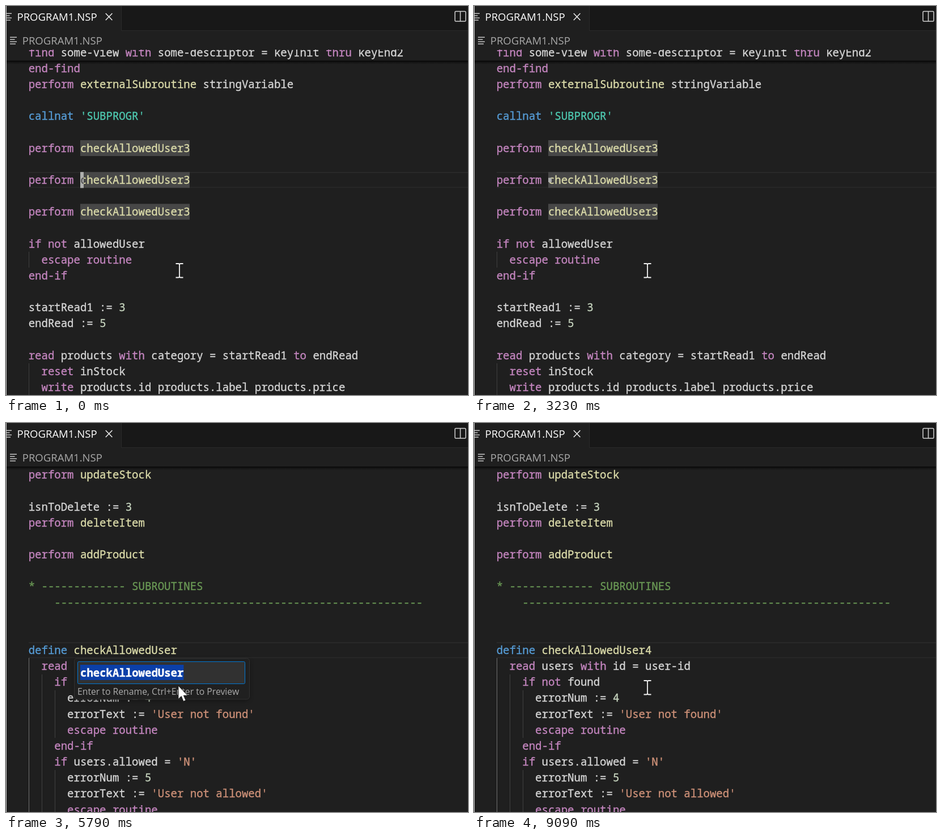
An HTML page for the animation above (9160 ms loop, 815 px wide and 687 px high).

```html
<!DOCTYPE html>
<html lang="en">
<head>
<meta charset="utf-8">
<title>Rename symbol</title>
<style>
  html, body { margin: 0; width: 100%; height: 100%; overflow: hidden; background: #1f1f1f; }
  svg { display: block; width: 815px; height: 687px; }
  text { white-space: pre; }
  .code { --ink: #d6d6d6; font: 19px "Noto Sans Mono", monospace; font-variant-ligatures: none; }
  .code, .code tspan { fill: var(--ink); stroke: var(--ink); stroke-width: .35px; }
  .ui { font: 18.5px "Open Sans", sans-serif; }
  .hint { font: 15.75px "Open Sans", sans-serif; fill: #ababab; }
  .key { --ink: #c586c0; }
  .fn { --ink: #dcdcaa; }
  .def { --ink: #569cd6; }
  .prog { --ink: #4ec9b0; }
  .str { --ink: #ce9178; }
  .num { --ink: #c6d4be; }
  .note { --ink: #6a9955; }
  #under { --ink: #515052; }
  .picked { --ink: #fff; font-weight: 600; }
</style>
</head>
<body>
<svg viewBox="0 0 815 687">
  <defs>
    <linearGradient id="shade" x2="0" y2="1">
      <stop stop-color="#000" stop-opacity=".85"/>
      <stop offset=".35" stop-color="#000" stop-opacity=".4"/>
      <stop offset="1" stop-color="#000" stop-opacity="0"/>
    </linearGradient>
    <clipPath id="stickyClip"><rect y="77" width="815" height="20"/></clipPath>
    <clipPath id="caretClip"><rect id="caretHole" width="6" height="28"/></clipPath>
    <filter id="soft" x="-10%" y="-20%" width="120%" height="140%"><feGaussianBlur stdDeviation="4"/></filter>
  </defs>
  <rect width="815" height="687" fill="#1f1f1f"/>

  <g id="calls"></g>
  <g id="routine"></g>

  <g id="caret">
    <rect id="bar" width="6" fill="#aeafad"/>
    <g clip-path="url(#caretClip)"><text id="under" class="code">c</text></g>
  </g>

  <g id="popup">
    <rect x="1" y="3" width="308" height="72" rx="6" fill="#000" opacity=".4" filter="url(#soft)"/>
    <rect x=".5" y=".5" width="309" height="72.5" rx="5" fill="#202020" stroke="#323232"/>
    <rect x="6.5" y="6.5" width="295" height="39" rx="2" fill="#313131" stroke="#0078d4"/>
    <rect id="picked" x="11" y="12" height="27" fill="#0b3fa8"/>
    <text id="field" class="code" x="11" y="32.7"></text>
    <rect id="ibar" y="14" width="2" height="23.5" fill="#e4e4e4"/>
    <text class="hint" x="6" y="65.3">Enter to Rename, Ctrl+Enter to Preview</text>
  </g>

  <rect width="815" height="43" fill="#181818"/>
  <rect width="204" height="44" fill="#1f1f1f"/>
  <path d="M203.5 0V43.5H815" fill="none" stroke="#2b2b2b"/>
  <rect y="44" width="815" height="33" fill="#1f1f1f"/>
  <g id="icons" fill="#c5c5c5"></g>
  <text class="ui" x="19.5" y="26.3" fill="#fff">PROGRAM1.NSP</text>
  <text class="ui" x="28.8" y="68" fill="#a9a9a9">PROGRAM1.NSP</text>
  <path d="M175.8 13l11.6 12M187.4 13l-11.6 12" stroke="#e8e8e8" stroke-width="1.6"/>
  <path d="M793.5 9.5h16q1.5 0 1.5 1.5v14.5q0 1.5-1.5 1.5h-16q-1.5 0-1.5-1.5V11q0-1.5 1.5-1.5zM801.5 9.5v17.5" fill="none" stroke="#d0d0d0" stroke-width="1.5"/>
  <rect width="1" height="687" fill="#ccc"/>

  <path id="beam" d="M299.5 455h4.5q2 0 2 2q0-2 2-2h4.5M306 456.5v21M299.5 479.5h4.5q2 0 2-2q0 2 2 2h4.5" fill="none" stroke="#f2f2f2" stroke-width="1.8"/>
  <path id="arrow" d="M304 464v23.5l5.3-5 3.7 9 4-1.7-3.7-8.6h7z" fill="#fff" stroke="#111" stroke-width=".8"/>
</svg>
<script>
const LOOP = 9160, TICK = LOOP / 136, CH = 11.4, ROW = 28.15, LEFT = 40;
const $ = id => document.getElementById(id);
const show = (el, on) => el.setAttribute('display', on ? 'inline' : 'none');
const set = (el, attrs) => { for (const k in attrs) el.setAttribute(k, attrs[k]); };
const put = (el, s) => { if (el.textContent !== s) el.textContent = s; };

const keys = 'find with thru end-find perform if not escape routine end-if read to reset write'.split(' ');
const fns = 'externalSubroutine updateStock deleteItem addProduct'.split(' ');

function kind(w) {
  if (keys.includes(w)) return 'key';
  if (fns.includes(w)) return 'fn';
  if (w === '@') return 'fn name';
  if (w === 'callnat' || w === 'define') return 'def';
  if (w[0] === "'") return w === "'SUBPROGR'" ? 'prog' : 'str';
  return /^\d+$/.test(w) ? 'num' : '';
}

function paint(src) {
  if (/^(\*| +--)/.test(src)) return `<tspan class="note">${src}</tspan>`;
  return src.replace(/'[^']*'|[^\s']+/g, w => `<tspan class="${kind(w)}">${w}</tspan>`);
}

const line = (src, base) => `<text class="code" x="${LEFT - 0.3}" y="${base}">${paint(src)}</text>`;

// Lines are stacked from the given row, counted from the current one
function block(lines, first, base) {
  return lines.map((s, i) => s && line(s, (base + (first + i) * ROW).toFixed(2))).join('');
}
const guide = (col, y, end, color = '#404040') =>
  `<rect x="${Math.round(LEFT + col * CH)}" y="${y}" width="1" height="${end - y}" fill="${color}"/>`;
const current = y =>
  `<path d="M40 ${y + 1}H815M40 ${y + 27.3}H815" stroke="#292929" stroke-width="1.8"/>`;
const shade = y => `<rect y="${y}" width="815" height="6" fill="url(#shade)"/>`;

const marks = [237, 293.2, 349.4].map(y =>
  `<rect x="131" y="${y}" width="193" height="28" fill="#474747"/>`).join('');

$('calls').innerHTML = current(293) + `<g id="marks">${marks}</g>` +
  guide(0, 434, 462) + guide(0, 631, 687) + block([
    'end-find', 'perform externalSubroutine stringVariable', '', "callnat 'SUBPROGR'", '',
    'perform @', '', 'perform @', '', 'perform @', '',
    'if not allowedUser', '  escape routine', 'end-if', '',
    'startRead1 := 3', 'endRead := 5', '',
    'read products with category = startRead1 to endRead', '  reset inStock',
    '  write products.id products.label products.price'
  ], -7, 314) + shade(97) + '<rect y="96.5" width="815" height="1.5" fill="#080808"/>' +
  `<g clip-path="url(#stickyClip)">${line('find some-view with some-descriptor = keyInit thru keyEnd2', 89)}</g>`;

$('routine').innerHTML = current(387) +
  '<rect id="target" x="119.7" y="387.3" width="182.3" height="28" fill="#623315"/>' +
  guide(0, 415, 687, '#707070') + guide(2, 444, 687) + guide(4, 472, 556) + guide(4, 613, 687) +
  block([
    'perform updateStock', '', 'isnToDelete := 3', 'perform deleteItem', '',
    'perform addProduct', '', '* ' + '-'.repeat(13) + ' SUBROUTINES', '    ' + '-'.repeat(57), '', '',
    'define @', '  read users with id = user-id', '    if not found',
    '      errorNum := 4', "      errorText := 'User not found'", '      escape routine', '    end-if',
    "    if users.allowed = 'N'", '      errorNum := 5', "      errorText := 'User not allowed'",
    '      escape routine'
  ], -11, 408) + shade(77);

const fileIcon = (x, y) => [12, 8.5, 12, 10].map((w, i) =>
  `<rect x="${x}" y="${y + i * 3.9}" width="${w}" height="1.5"/>`).join('');
$('icons').innerHTML = fileIcon(-2, 12.5) + fileIcon(7, 54.5);

const names = [...document.querySelectorAll('.name')];

// [shown from, blink starts]
const blinks = [[0, 530], [3240, 3740], [4440, 4900], [7200, 7710]];

function caretScale(t, start) {
  if (t < start) return 1;
  const u = (t - start) % 1000, v = Math.min(u, 1000 - u);
  const p = Math.max(0, Math.min(1, (v - 100) / 300));
  return 1 - p * p * (3 - 2 * p);
}

function drawCaret(t, second) {
  const [from, start] = blinks.filter(b => b[0] <= t).pop();
  const stepped = Math.floor((t + 15) / TICK) * TICK;
  const h = 28.2 * caretScale(stepped, start);
  const x = second ? 119.3 : 131, y = second ? 387.3 : 293.2;
  set($('bar'), { x, y: y + 14.1 - h / 2, height: h });
  set($('caretHole'), { x, y });
  set($('under'), { x: LEFT - 0.3 + (second ? 7 : 8) * CH, y: second ? 408 : 314 });
  show($('under'), t < from + 530);
}

function drawPopup(t, second) {
  const word = 'checkAllowedUser';
  const value = second ? word + (t < 7000 ? '' : '4') : word + (t < 2480 ? '3' : '');
  const picked = t < (second ? 6200 : 1820);
  const caretOn = !picked && (second ? t < 6730 || t >= 7000 : t < 2350 || t >= 2880);
  const width = value.length * CH;
  $('popup').setAttribute('transform', second ? 'translate(120 415)' : 'translate(132 322)');
  put($('field'), value);
  $('field').classList.toggle('picked', picked);
  set($('picked'), { width });
  set($('ibar'), { x: 11 + width });
  show($('picked'), picked);
  show($('ibar'), caretOn);
}

function draw(t) {
  const second = t >= 4440;
  const open = second ? t >= 5720 && t < 7200 : t >= 1010 && t < 3230;
  const suffix = t < 3300 ? '3' : t < 7200 ? '' : '4';
  show($('calls'), !second);
  show($('routine'), second);
  show($('marks'), t < 3300);
  show($('target'), t < 4770);
  names.forEach(n => put(n, 'checkAllowedUser' + suffix));
  show($('caret'), !open);
  show($('popup'), open);
  if (open) drawPopup(t, second); else drawCaret(t, second);
  show($('arrow'), open && second);
  show($('beam'), !(open && second));
}

const begin = performance.now();
function frame() {
  draw(Math.max(0, performance.now() - begin) % LOOP);
  requestAnimationFrame(frame);
}
draw(0);
requestAnimationFrame(frame);
</script>
</body>
</html>
```
